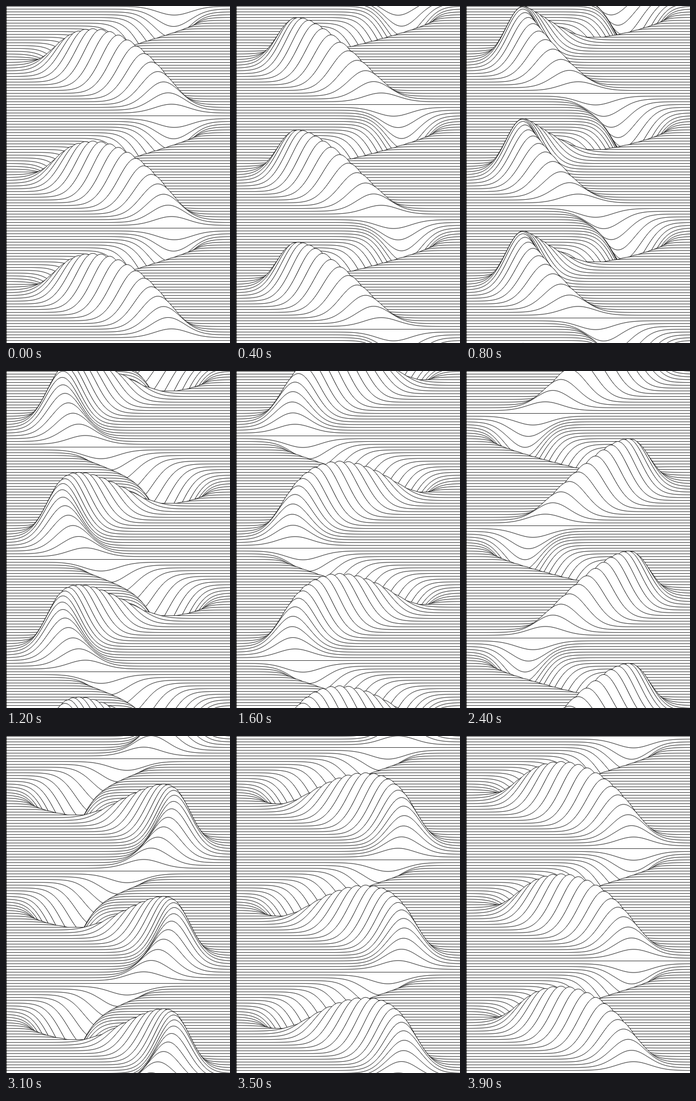
An HTML page with a canvas for the animation above (4000 ms loop, 400 by 600 pixels).

```html
<!DOCTYPE html>
<html lang="en">
<head>
<meta charset="utf-8">
<title>Line waves</title>
<style>
  html, body { margin: 0; width: 100%; height: 100%; overflow: hidden; background: #fff; }
  canvas { display: block; }
</style>
</head>
<body>
<canvas id="stage" width="400" height="600"></canvas>
<script>
const ctx = document.getElementById('stage').getContext('2d');
const WIDTH = 400, HEIGHT = 600;
const LOOP = 4000, STEPS = 40;
const SPACING = 5, PERIOD = 40;
const HEIGHT_OF_WAVE = 100, SWAY = 100, SIGMA = 30;
const turn = n => 2 * Math.PI * n / PERIOD;

function drawLine(i, step) {
  const base = i * SPACING;
  const center = WIDTH / 2 + SWAY * Math.cos(turn(i));
  const amp = HEIGHT_OF_WAVE * Math.sin(turn(i + step + 1));
  const curve = new Path2D();
  for (let x = 0; x <= WIDTH; x++) {
    const d = (x - center) / SIGMA;
    curve.lineTo(x, base + amp * Math.exp(-d * d / 2));
  }
  // White below each line hides the lines behind it.
  const body = new Path2D(curve);
  body.lineTo(WIDTH, HEIGHT + 400);
  body.lineTo(0, HEIGHT + 400);
  body.closePath();
  ctx.fill(body);
  ctx.stroke(curve);
}

function draw(step) {
  ctx.setTransform(1, 0, 0, 1, 0, 0);
  ctx.fillStyle = '#fff';
  ctx.strokeStyle = '#000';
  ctx.lineWidth = 1;
  ctx.fillRect(0, 0, WIDTH, HEIGHT);
  ctx.translate(0.5, 0.5);
  for (let i = -PERIOD; i <= HEIGHT / SPACING + PERIOD; i++) drawLine(i, step);
  ctx.fillStyle = '#000';
  ctx.fillRect(-0.5, -0.5, 1, HEIGHT);
}

let shown = -1;
function tick() {
  const step = Math.floor(performance.now() % LOOP / LOOP * STEPS);
  if (step !== shown) draw(shown = step);
  requestAnimationFrame(tick);
}
tick();
</script>
</body>
</html>
```
